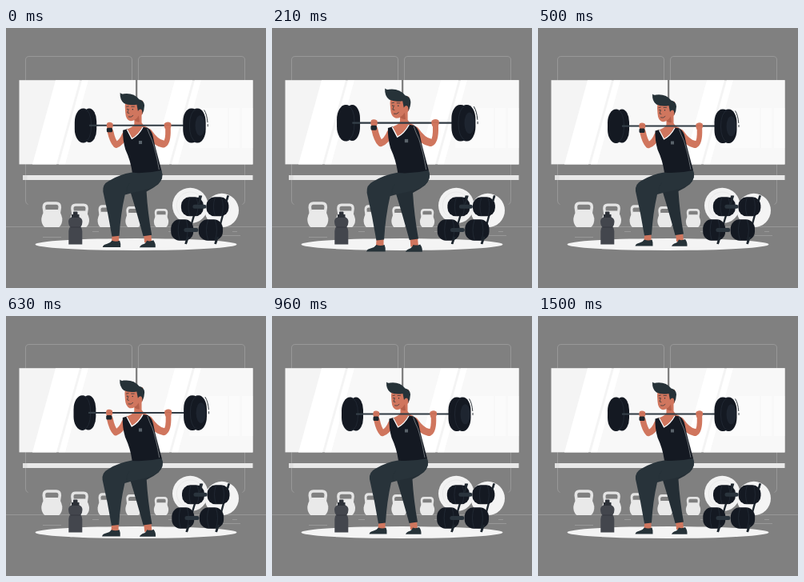
Recreate the animation shown at these times as an HTML page. Size 325 by 325 pixels, loop 1.54 s.

```html
<!DOCTYPE html>
<html lang="en">
<head>
<meta charset="utf-8">
<title>Squat</title>
<style>
html, body { margin: 0; width: 100%; height: 100%; overflow: hidden; background: #808080; }
svg { display: block; width: 100vw; height: 100vh; }
.line { fill: none; stroke: #a3a3a3; stroke-width: .7; }
.skin { fill: #d0765e; }
.arm { fill: none; stroke: #d0765e; stroke-linecap: round; stroke-linejoin: round; }
.pants { fill: #28333a; }
.dark { fill: #141922; }
.hair { fill: #263238; }
.ink { fill: none; stroke: #263238; stroke-width: .7; stroke-linecap: round; }
.rim { fill: none; stroke: #29323d; stroke-width: .6; }
</style>
</head>
<body>
<svg viewBox="0 0 325 325">
  <defs>
    <g id="kettle">
      <path d="M-9 -18 L-10 -25 Q-10 -30 -5.500 -30 H5.500 Q10 -30 10 -25 L9 -18" fill="none" stroke="#e4e4e4" stroke-width="3.600"/>
      <path d="M-9 0 Q-13.500 -4 -13 -11 Q-11.500 -19 -7.500 -22 H7.500 Q11.500 -19 13 -11 Q13.500 -4 9 0 Z" fill="#e9e9e9"/>
    </g>
    <g id="head">
      <rect x="-14" y="-12" width="28" height="24" rx="10.500" class="dark"/>
      <path d="M-3 -11.500 Q-7 0 -3 11.500 M5 -11.500 Q9 0 5 11.500" class="rim"/>
    </g>
  </defs>

  <rect width="325" height="325" fill="#808080"/>
  <path class="line" d="M24.500 216 V40 Q24.500 35.500 29 35.500 H153 Q157.500 35.500 157.500 40 V66 M165.500 66 V40 Q165.500 35.500 170 35.500 H294 Q298.500 35.500 298.500 40 V216 M24.500 216 Q24.500 219.500 27.500 220.500 M298.500 216 Q298.500 219.500 295.500 220.500"/>
  <path class="line" d="M0 248.500 H325 M46 261.500 H69 M108 254.500 H116 M271 259.500 H293 M283 254.500 H289 M203 254.500 H208"/>

  <rect x="16.500" y="65.200" width="292" height="105.200" fill="#f4f4f4"/>
  <path d="M103 65.200 H211 L182 170.400 H74 Z M244 65.200 H308.500 V170.400 H215 Z" fill="#f8f8f8"/>
  <path d="M62 65.200 H92 L63 170.400 H33 Z M95 65.200 H103 L74 170.400 H66 Z M211 65.200 H233 L204 170.400 H182 Z M236 65.200 H244 L215 170.400 H207 Z" fill="#fff"/>
  <path d="M229 100 H277 V150 H229 Z M279 100 H292 V150 H279 Z M295 100 H308.500 V150 H295 Z" fill="#fff" opacity=".4"/>
  <rect x="162" y="65" width="2.300" height="105.400" fill="#808080"/>
  <rect x="21" y="184" width="287.500" height="6" fill="#e9e9e9"/>
  <rect x="21" y="184" width="5.500" height="6" fill="#e0e0e0"/>

  <g id="kettles"></g>
  <ellipse cx="162.500" cy="270.500" rx="126" ry="7.500" fill="#f4f4f4"/>
  <circle cx="269.800" cy="228" r="21.200" fill="#f4f4f4"/>
  <circle cx="230.300" cy="222" r="22.300" fill="#f2f2f2"/>
  <circle cx="230.300" cy="222" r="17" fill="none" stroke="#e6e6e6" stroke-width=".8"/>

  <path d="M83 236 Q78 237.500 78 242 Q78 246 80 248.500 Q78.300 251 78.300 254 V270.500 H95.300 V254 Q95.300 251 93.500 248.500 Q95.500 246 95.500 242 Q95.500 237.500 90.500 236 Z" fill="#43464d"/>
  <path d="M84 233 V230.500 Q84 229.500 85 229.500 H88.500 Q89.500 229.500 89.500 230.500 V233 H91.500 V237 H82 V233 Z" fill="#2d3138"/>
  <path d="M81 249 H93" stroke="#34373e"/>

  <g id="man">
    <path class="skin" d="M133.300 256 H141.500 V267 H132.500 Z M172 255 H181 L182 267 H173 Z"/>
    <path class="hair" d="M121.500 272.500 Q122 269.500 127 268.500 Q131 267.500 133 264.500 Q138 266.500 142.500 264.500 Q144 268 143.500 272.500 Z M167 272.800 Q168 270 173 268.500 Q175 267 176 264.500 Q180 266 184 264 Q187 268 186.500 272.800 Z"/>

    <path fill="#242e35" d="M164 181 L194 178 Q197 187 190 195 Q184 200 175.500 204 Q177 230 182 257.500 L171.500 259 Q163 228 156.500 207 Q152 196 158 190 Z"/>
    <path class="pants" d="M157.500 180.500 L193.800 178 Q198 188 189 195.500 Q180 201.500 160 205 L149 208 Q143.500 232 142 258.500 L133 259.500 Q128.500 232 122 204 Q121 195 129 191 Q142 183 157.500 180.500 Z"/>
    <path d="M151.500 206 Q150 199 154.500 194" class="ink"/>

    <path class="arm" stroke-width="7.500" d="M149 134 Q145 144 138 146.500 Q133.500 142 131 130"/>
    <path class="arm" stroke-width="9" d="M178 131 Q187 144 196 145.500"/>
    <path class="arm" stroke-width="6.500" d="M197.500 146 Q202.500 143 202 127"/>

    <path class="skin" d="M160.500 108 H169.500 V119 Q172 123.500 177 125 L157.500 139 L149 128 Q159 125 160.500 121 Z"/>
    <path class="dark" d="M146.500 128.500 L152 127 L157.500 139 Q165 135 170.500 124.500 L177 125.500 Q182 129 183.500 136 Q185.500 147 189 159 L194 178 Q176 182 158 180.800 Q156 166 149.500 152 Q146 140 146.500 128.500 Z"/>
    <path d="M151.500 127.500 L157.500 139 Q165.500 135 171 124.800" fill="none" stroke="#fff" stroke-width="1.300"/>
    <path d="M176.500 126.500 Q179 134 182.500 141 Q187.500 156 191 177" fill="none" stroke="#a4a9ab" stroke-width=".6"/>
    <rect x="166" y="141.500" width="4" height="4" fill="#59626a"/>

    <path class="skin" d="M149.500 93 Q148.500 99 149.500 107 Q150 115 155 117 Q161 118 165.500 111 Q171 111 171.500 105 L171 92 Z"/>
    <path d="M160.500 116 Q164 114 166 110.500 L167 118 Q163.500 119 160.500 116 Z" fill="#b45f4a"/>
    <path class="hair" d="M143 82.500 Q145 84.500 147.500 83.500 Q160 82 166.500 90.500 Q172.800 92 173 98 Q173 104 170 109 Q171 103 168 102.500 Q166 102.500 165 105 L163.500 97 Q154 98.500 148 95.500 Q142.500 91.500 143 82.500 Z"/>
    <path class="ink" d="M151 99.500 L153.500 99 M157 99.500 L160.500 99.500 M153.500 102.500 L152 107 L154 107.500 M153.500 112 Q157 113 159 110.500"/>
    <circle cx="152" cy="102.500" r=".7" class="hair"/>
    <circle cx="158.500" cy="102.800" r=".7" class="hair"/>

    <path d="M104 122.600 H224" stroke="#303a43" stroke-width="2"/>
    <rect x="96" y="101.500" width="18" height="42" rx="9" ry="16" class="dark"/>
    <rect x="87" y="101.500" width="21" height="42.500" rx="10.500" ry="17" class="dark"/>
    <path d="M98.500 102 Q107.500 104 107.500 122.600 Q107.500 141 98.500 143.500" class="rim"/>
    <path d="M105 122.600 H114" stroke="#36414a" stroke-width="2"/>

    <rect x="220.500" y="101.500" width="21" height="42.500" rx="10" ry="16" class="dark"/>
    <rect x="228" y="101.500" width="20.500" height="42.500" rx="10" ry="17" class="dark"/>
    <ellipse cx="241.500" cy="122.800" rx="6" ry="12.500" fill="#1e2530"/>
    <path d="M237 102 Q228.500 106 228.500 122.800 Q228.500 139 237 143.500" class="rim"/>
    <path d="M246.500 103.500 Q250 109 250.800 119 M251 121 V124" fill="none" stroke="#20282e" stroke-width=".9"/>

    <path class="skin" d="M127 119.500 Q130 117.500 134 120 Q135 124 133 127 H127.500 Q125.500 123 127 119.500 Z M197.500 120 Q201 117 205.500 119.500 Q207 123 204.500 127 H198.500 Q196.500 123 197.500 120 Z"/>
    <path d="M127.500 122 H133.500 M198.500 122 H205" stroke="#b45f4a" stroke-width=".5"/>
    <rect x="126.500" y="125.500" width="7" height="5.500" rx="1.500" fill="#1c252c"/>
  </g>

  <g id="rack">
    <path d="M242.500 209.500 L224.500 270 M277.500 209.500 L261.500 270" stroke="#1f272f" stroke-width="2.400"/>
    <use href="#head" transform="translate(233 223.300)"/>
    <use href="#head" transform="translate(264.500 223.300)"/>
    <use href="#head" transform="translate(220.300 252.500) scale(1 1.100)"/>
    <use href="#head" transform="translate(256 252.500) scale(1.080 1.100)"/>
    <path d="M236 223.300 H248 M225 252.500 H238" stroke="#2a343d" stroke-width="5" stroke-linecap="round"/>
    <path d="M244.300 209.500 L241 220 M278 209.500 L275.500 217 M228 261 L225 270 M265 261 L262 270" stroke="#1f272f" stroke-width="2.200"/>
  </g>
</svg>
<script>
const LOOP = 1540, STEP = LOOP / 37, CYCLE = 1500, LEAD = 22;
const byId = id => document.getElementById(id);

// [share of cycle, value]
const pulse = [[0, 1], [.1, 1.1], [.3, 1], [.4, 1], [.5, 1.1], [.6, 1], [1, 1]];
const shake = [[0, 0], [.1, -1], [.2, 2], [.3, -4], [.4, 4], [.5, -4],
               [.6, 4], [.7, -4], [.8, 2], [.9, -1], [1, 0]];

function sample(keys, p) {
  const i = Math.max(1, keys.findIndex(k => k[0] >= p));
  const [a, u] = keys[i - 1], [b, v] = keys[i];
  return u + (v - u) * (p - a) / (b - a);
}

// [centre x, width scale, height scale]
byId('kettles').innerHTML = [[57.3, 1, 1], [92, .92, .93], [125, .8, .87], [159, .74, .82], [194, .7, .72]]
  .map(([x, w, h]) => `<use href="#kettle" transform="translate(${x} 249) scale(${w} ${h})"/>`).join('');

const man = byId('man'), rack = byId('rack');

function draw(now) {
  const t = Math.floor((now % LOOP + 3) / STEP) % 37 * STEP;
  const p = Math.min(1, (t + LEAD) / CYCLE);
  man.setAttribute('transform', `translate(168 177) scale(${sample(pulse, p)}) translate(-168 -177)`);
  rack.setAttribute('transform', `translate(${sample(shake, p) * .65} 0)`);
}

let start;
function tick(now) {
  start ??= now;
  draw(now - start);
  requestAnimationFrame(tick);
}
draw(0);
requestAnimationFrame(tick);
</script>
</body>
</html>
```
